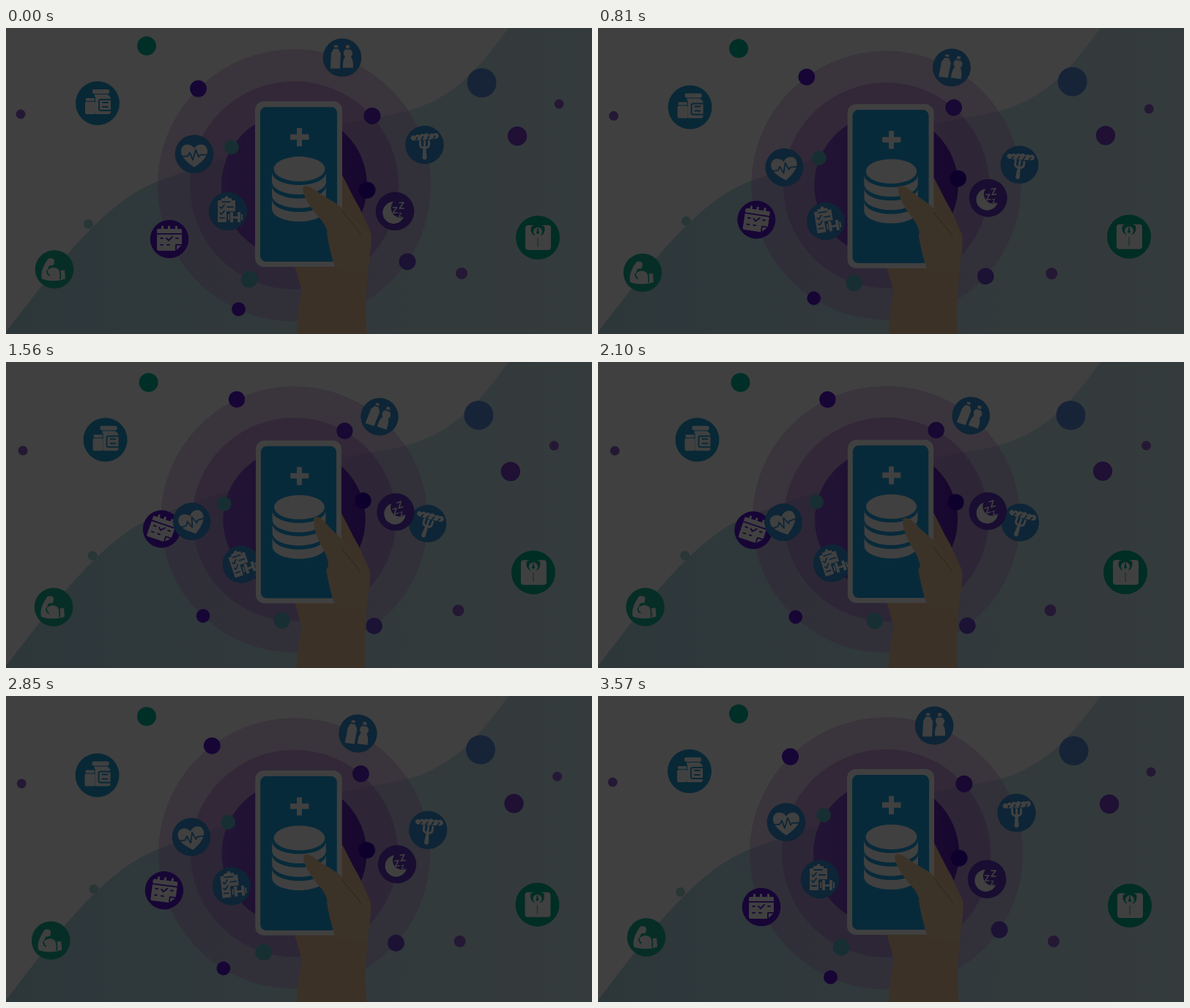
An HTML page that plays this animation: 800x419 px, repeating every 3600 ms.

```html
<!DOCTYPE html>
<html lang="en">
<head>
<meta charset="utf-8">
<title>Health data</title>
<style>
  html, body { margin: 0; width: 100%; height: 100%; overflow: hidden; background: #404040; }
  svg { display: block; width: 800px; height: 419px; }
  .icon { fill: #fff; stroke-linejoin: round; stroke-linecap: round; }
  .cut { fill: currentColor; }
  .line { fill: none; stroke: currentColor; stroke-width: 1.8; }
  .limb { fill: none; stroke: #fff; stroke-width: 3; }
  text { font: 700 13px Inter, Arial, sans-serif; text-anchor: middle; }
</style>
</head>
<body>
<svg id="stage" viewBox="0 0 800 419"></svg>
<script>
const LOOP = 3600;
const CENTER = [393.5, 215.5];
const violet = '#5a14d8', sky = '#3592d8', teal = '#5cbac6', lilac = '#9460d4', green = '#00bd9c';

const icons = {
  bottles: `<path d="M-11-17h5v4l4 7-1 21h-13l1-21 4-7zM5-17h5v5c5 4 5 7 2 11 3 4 3 9 3 15H1c0-6 0-11 3-15-3-4-3-8 1-11z"/>
    <path class="line" stroke-width="1" d="M-11-13h5M5-12h5"/>`,
  pills: `<rect x="-7" y="-19" width="23" height="6" rx="2"/><path d="M-4-12h17q5 2 5 7v17q0 3-3 3h-16q-3 0-3-3V-5q0-5 0-7z"/>
    <path class="line" d="M18-5H4q-2 0-2 2v11q0 2 2 2h14M7-1h7M7 5h7"/>
    <path class="cut" d="M-18-9h15v26h-15z"/><rect x="-16" y="-7" width="12" height="4" rx="1"/><rect x="-17" y="-2" width="14" height="17" rx="2"/>`,
  heart: `<path d="M0 18C-10 11-18 4-18-4c0-11 13-12 18-4 5-8 18-7 18 4 0 8-8 15-18 22z"/>
    <path class="line" d="M-18 3h9l3-5 4 10 4-14 4 10 2-3h10"/>`,
  fork: `<path d="M-19-9q1-6 6-3 2-4 6-1 3-4 6-1 4-4 7 0 4-3 6-1 5-3 7 1 2 5-5 6l-24 2q-8 1-9-3z"/>
    <path class="limb" d="M-6-5v5q0 4 6 4 6 0 6-4v-5M0-5v22"/><path d="M-2 4h4l1 14q-3 5-6 0z"/>
    <path class="line" d="M-12-6l2-4M-4-7l2-4M4-8l2-4M12-8l2-4"/>`,
  calendar: `<path d="M-15-14h30q2 0 2 2v20l-8 8h-24q-2 0-2-2v-26q0-2 2-2zM-11-18h3v6h-3zM-2-18h3v6h-3zM8-18h3v6h-3z"/>
    <path class="line" d="M-17-7h34M-12-1h3M-12 8h3M-3 8h3M-4-1l3 3 5-5M9-1h3M17 8H9v8"/>`,
  clipboard: `<path d="M-14-15h5v-3h4l2-3h2l2 3h4v3h5v30h-24z"/>
    <path class="line" d="M-8-13H3M-11-6l2 2 4-5M-1-6h8M-11 2l2 2 4-5M-11 9h6"/>
    <path class="cut" d="M-2 0h23v16H-2z"/>
    <path d="M0 4h2v8H0zM3 1h4v14H3zM7 7h6v3H7zM13 1h4v14h-4zM18 4h2v8h-2z"/>`,
  moon: `<path d="M-2-13A15 15 0 1 0 12 8 13 13 0 0 1-2-13z"/>
    <text x="9" y="-3" font-size="13">Z</text><text x="0" y="3" style="font-size:12px">Z</text><text x="7" y="8" style="font-size:8px">Z</text>`,
  scale: `<rect x="-17" y="-17" width="35" height="34" rx="4"/><path class="cut" d="M-9-15q9-7 18 0 2 8-4 12h-10q-6-4-4-12z"/>
    <circle cy="-8" r="6"/><path class="line" d="M0-12v5"/><circle class="cut" cy="-7" r="2"/>
    <path class="line" stroke-opacity=".5" d="M0 1v11"/>`,
  arm: `<path d="M-8-15q7-1 8 3l-1 6-6 1-3 7c5-6 13-6 17 0l7-1 1 12c-9 3-22 4-32 0-2-9 2-19 9-28z"/>
    <path class="line" stroke-width="1" d="M-10 2q0 4 3 6M7 1q2 5 1 12"/>`
};

const dot = (x, y, r, color) => `<circle cx="${x}" cy="${y}" r="${r}" fill="${color}"/>`;
const badge = (x, y, r, color, name) =>
  `<g class="icon" color="${color}" transform="translate(${x} ${y})"><circle class="cut" r="${r}"/>${icons[name]}</g>`;

// Items riding on each ring; lead shifts the swing in time.
const orbits = [
  { swing: 20, lead: 0, items:
    badge(459, 40.5, 26.3, sky, 'bottles') + badge(571.5, 160, 26.3, sky, 'fork') +
    badge(223, 289, 26.3, violet, 'calendar') + dot(262.5, 83, 11.5, violet) +
    dot(317.5, 385, 9.5, violet) + dot(548, 320, 11.5, '#6a48d0') },
  { swing: -20, lead: -60, items:
    badge(257, 172.5, 26.3, sky, 'heart') + badge(531, 251, 26.3, '#6534c4', 'moon') +
    dot(500, 120.5, 11.5, '#6020cc') + dot(332, 344, 11.5, teal) },
  { swing: -19.5, lead: 60, items:
    badge(303, 251, 26.3, sky, 'clipboard') + dot(493, 222, 11.5, '#3800b4') + dot(308, 163, 10, teal) }
];

// Free items wander on a curve given by a start and three offsets.
const drifters = [
  [dot(0, 0, 13, green), 192, 24.5, [-.2, 2.2, 1, 3.5, 2.5, 3.5]],
  [badge(0, 0, 30, '#1f9fd8', 'pills'), 125, 103, [-2.2, 3.7, 6.2, 4.5, 10.5, 3.5]],
  [dot(0, 0, 6.5, lilac), 20, 118, [.5, .5, 2.2, 3.7, 3, 3.5]],
  [dot(0, 0, 6.5, '#a5d8d8'), 112.5, 268.5, [4.2, -2.2, 8, -4.5, 6, -3.5]],
  [badge(0, 0, 26.3, '#18b698', 'arm'), 66, 330.5, [-2.5, 2.7, -5, 4.5, -1.5, 5]],
  [dot(0, 0, 20, '#5a8ee0'), 649.5, 75, [-.7, -1, -2.7, -1.5, -4, -2]],
  [dot(0, 0, 6.5, lilac), 755, 104, [-1.2, 3, -4.2, 9, -6.5, 10.5]],
  [dot(0, 0, 13.2, '#7d3fd0'), 698, 148, [-2.2, -.2, -7, -.8, -9, 1.5]],
  [badge(0, 0, 30, '#00b490', 'scale'), 726, 287, [.5, -1, -3.7, -.5, -6, 1]],
  [dot(0, 0, 8, lilac), 622, 336, [-1.2, -.5, -3.7, 2, -4.5, 4]]
];
const KNOTS = [0, .155, .665, .933];

const disks = [[186.5, 'rgba(196,140,214,.42)'], [142.5, 'rgba(160,95,200,.42)'], [99.5, 'url(#core)']]
  .map(([r, color]) => dot(...CENTER, r, color)).join('');
const bands = [198, 216.5, 235]
  .map(y => `<path d="M363 ${y}A37 17 0 0 0 437 ${y}v13A37 17 0 0 1 363 ${y + 13}z"/>`).join('');

const stage = document.getElementById('stage');
stage.innerHTML = `
  <defs>
    <linearGradient id="sea"><stop stop-color="#b4dbe8"/><stop offset="1" stop-color="#d2ebf2"/></linearGradient>
    <linearGradient id="core"><stop stop-color="#8a50d0"/><stop offset="1" stop-color="#5c1cbc"/></linearGradient>
  </defs>
  <rect width="800" height="419" fill="#fff"/>
  <path fill="url(#sea)" d="M0 416C60 340 130 236 215 207 320 170 420 135 520 120 610 105 645 55 686 0H800V419H0z"/>
  <g id="disks">${disks}</g>
  ${orbits.map(o => `<g class="orbit">${o.items}</g>`).join('')}
  ${drifters.map(d => `<g class="drift">${d[0]}</g>`).join('')}
  <g id="device">
    <path fill="#eec496" d="M455 195C463 207 472 229 482 245L498 280Q499 292 496 312C493 350 488 380 494 430H396Q398 390 404 360L393 322 440 300z"/>
    <rect x="340" y="100" width="119" height="227" rx="12" fill="#fff"/>
    <rect x="347" y="108" width="105" height="212" rx="8" fill="#1ba6e6"/>
    <g fill="#fff">
      <path d="M397 137h7v8.500h9.500v7.500H404v9h-7v-9h-9v-7.500h9z"/>
      <ellipse cx="400.500" cy="193" rx="35" ry="17"/>${bands}
    </g>
    <path fill="#f0cba0" d="M438 280C440 296 446 318 450 330L492 335Q500 300 498 283L459 248z"/>
    <path id="thumb" fill="#f0cba0" d="M405 219C407 214 416 217 422 222 437 234 448 236 460 248L485 284 470 315 447 308C444 292 438 273 432 265 420 251 406 235 405 219z"/>
    <path fill="none" stroke="#d5a270" stroke-width="1.500" d="M459 249C466 262 478 270 485 284"/>
  </g>
  <rect width="800" height="419" opacity=".75"/>`;

const orbitNodes = stage.querySelectorAll('.orbit');
const driftNodes = stage.querySelectorAll('.drift');
const [disksNode, device, thumb] = ['disks', 'device', 'thumb'].map(id => document.getElementById(id));

const wave = t => (1 - Math.cos(2 * Math.PI * t / LOOP)) / 2;
const scaleAbout = (x, y, s) => `translate(${x} ${y}) scale(${s}) translate(${-x} ${-y})`;

// Weight of each knot in the cubic through all four.
const weights = e => KNOTS.map((k, i) =>
  KNOTS.reduce((w, other, j) => i === j ? w : w * (e - other) / (k - other), 1));

function draw(t) {
  const pulse = wave(t + 150);
  const shrink = scaleAbout(...CENTER, 1 - .023 * pulse);
  disksNode.setAttribute('transform', shrink);
  orbits.forEach((o, i) => {
    const angle = o.swing * wave(t + o.lead);
    orbitNodes[i].setAttribute('transform', `rotate(${angle} ${CENTER}) ${shrink}`);
  });

  const w = weights(wave(t));
  drifters.forEach(([, x, y, p], i) => {
    const along = axis => w[1] * p[axis] + w[2] * p[2 + axis] + w[3] * p[4 + axis];
    driftNodes[i].setAttribute('transform', `translate(${x + along(0)} ${y + along(1)})`);
  });

  device.setAttribute('transform', scaleAbout(399.5, 520, 1 - .018 * pulse));
  thumb.setAttribute('transform', `rotate(${13 * pulse * pulse} 462 285)`);
}

function tick() {
  draw(performance.now() % LOOP);
  requestAnimationFrame(tick);
}
tick();
</script>
</body>
</html>
```
